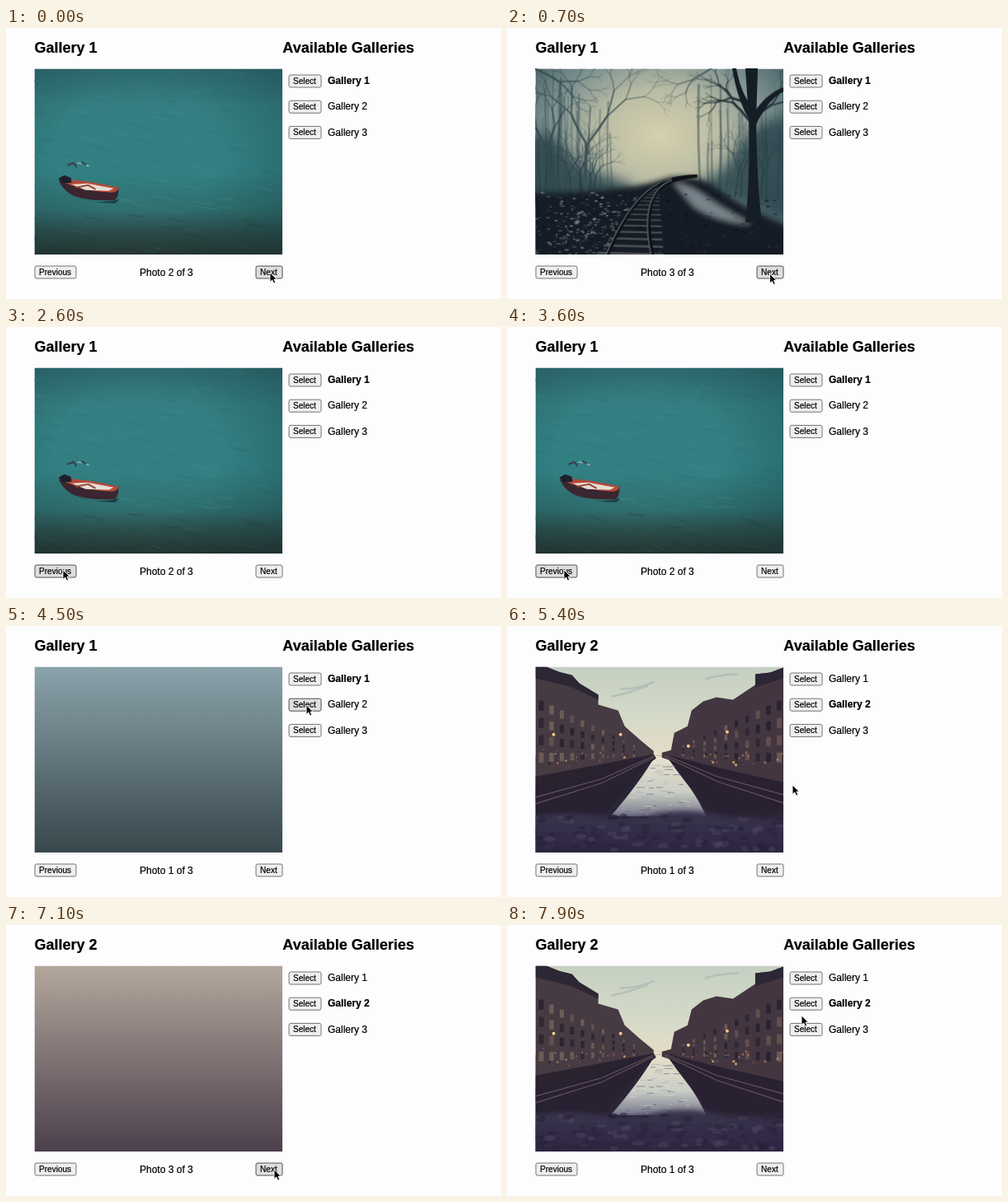
Animation, 600 px wide and 329 px high, one loop 8000 ms. Source, as an HTML page:

```html
<!DOCTYPE html>
<html lang="en">
<head>
<meta charset="utf-8">
<title>Photo galleries</title>
<style>
html, body { margin: 0; width: 100%; height: 100%; overflow: hidden; background: #fdfcfe; }
#stage { display: block; width: 600px; height: 329px; font: 12px "Liberation Sans", Arial, sans-serif; }
text { stroke: #000; stroke-width: .2px; }
.title { font-size: 18px; font-weight: bold; }
.btn rect { fill: #efefef; stroke: #747474; }
.btn text { font-size: 10px; }
.btn.hover rect { fill: #dedede; stroke: #505050; }
.bold { font-weight: bold; }
.photo { visibility: hidden; }
.photo.on { visibility: visible; }
</style>
</head>
<body>
<svg id="stage" viewBox="0 0 600 329">
  <defs>
    <linearGradient id="sea" x2="0" y2="1">
      <stop offset="0" stop-color="#316e73"/><stop offset=".2" stop-color="#347e81"/>
      <stop offset=".55" stop-color="#328083"/><stop offset=".76" stop-color="#316f6f"/>
      <stop offset=".88" stop-color="#2d4f4c"/><stop offset="1" stop-color="#2a3733"/>
    </linearGradient>
    <radialGradient id="vignette" cx=".42" cy=".45" r=".75">
      <stop offset=".45" stop-color="#0d2b30" stop-opacity="0"/><stop offset="1" stop-color="#0d2b30" stop-opacity=".32"/>
    </radialGradient>
    <radialGradient id="mist" cx=".5" cy=".36" r=".62">
      <stop offset="0" stop-color="#d6d0ad"/><stop offset=".4" stop-color="#b9bca4"/>
      <stop offset=".72" stop-color="#7e9291"/><stop offset="1" stop-color="#4d676c"/>
    </radialGradient>
    <linearGradient id="dusk" x2="0" y2="1">
      <stop offset="0" stop-color="#c5d0c2"/><stop offset=".3" stop-color="#d6dac8"/><stop offset=".48" stop-color="#e6dcc6"/>
    </linearGradient>
    <linearGradient id="water" x2="0" y2="1">
      <stop offset="0" stop-color="#e8e1cd"/><stop offset=".6" stop-color="#c9cdc4"/><stop offset="1" stop-color="#77778a"/>
    </linearGradient>
    <linearGradient id="cobbles" x2="0" y2="1">
      <stop offset="0" stop-color="#3b3550"/><stop offset="1" stop-color="#28203b"/>
    </linearGradient>
    <linearGradient id="path" x2="0" y2="1">
      <stop offset="0" stop-color="#a5685f"/><stop offset=".25" stop-color="#8f5257"/><stop offset="1" stop-color="#743f50"/>
    </linearGradient>
    <linearGradient id="plainA" x2="0" y2="1">
      <stop offset="0" stop-color="#8ba3ab"/><stop offset="1" stop-color="#38474c"/>
    </linearGradient>
    <linearGradient id="plainB" x2="0" y2="1">
      <stop offset="0" stop-color="#b3a79c"/><stop offset="1" stop-color="#4b3f4c"/>
    </linearGradient>
    <filter id="soft1"><feGaussianBlur stdDeviation=".7"/></filter>
    <filter id="soft3" x="-20%" y="-20%" width="140%" height="140%"><feGaussianBlur stdDeviation="3"/></filter>
    <filter id="soft8" x="-30%" y="-50%" width="160%" height="200%"><feGaussianBlur stdDeviation="8"/></filter>
  </defs>

  <text class="title" id="heading" x="34.5" y="30">Gallery 1</text>
  <text class="title" x="335.3" y="30">Available Galleries</text>

  <svg x="34.5" y="49.5" width="300.5" height="225.5" viewBox="0 0 300 225" preserveAspectRatio="none">
    <g class="photo" id="p11"><rect width="300" height="225" fill="url(#plainA)"/></g>

    <g class="photo" id="p12">
      <rect width="300" height="225" fill="url(#sea)"/>
      <g id="waves" fill="none" filter="url(#soft1)"/>
      <rect width="300" height="225" fill="url(#vignette)"/>
      <g filter="url(#soft1)">
        <path d="M36 149Q68 168 103 158L98 163Q60 163 36 149" fill="#193f45"/>
        <path d="M29 135Q62 147 102 144Q102 154 98 159Q70 161 50 155Q36 150 29 135" fill="#3a2630"/>
        <path d="M29 134Q60 134 102 144Q101 149 94 150Q52 148 29 134" fill="#b4493a"/>
        <path d="M45 140L64 139L96 145L90 148L62 147Z" fill="#e6ddd3"/>
        <path d="M50 144L65 141L74 146" fill="none" stroke="#96493e" stroke-width="2"/>
        <path d="M29 133L36 129L44 132L45 138L34 139Z" fill="#1d1f2c"/>
        <path d="M40 117L47 114L51 119M57 113L62 116" fill="none" stroke="#393d4c" stroke-width="2"/>
        <path d="M52 114L57 115M63 117L66 118" stroke="#a3b5b5" stroke-width="1.5"/>
      </g>
    </g>

    <g class="photo" id="p13">
      <rect width="300" height="225" fill="url(#mist)"/>
      <g filter="url(#soft8)">
        <path d="M-30 70L25 85L55 120L115 140V165H-30Z" fill="#28434b" opacity=".85"/>
        <path d="M330 45L265 70L225 125L190 142L330 190Z" fill="#2c454e" opacity=".85"/>
      </g>
      <g id="trees" fill="none" stroke-linecap="round" filter="url(#soft1)"/>
      <g filter="url(#soft3)">
        <path d="M-10 150Q80 152 140 138L165 131Q200 128 225 148T310 192V240H-10Z" fill="#161d25"/>
        <path d="M166 137Q190 142 205 154T262 188Q220 186 192 167Z" fill="#77838a"/>
      </g>
      <g id="snow"/>
      <g id="sleepers" stroke="#4a5054"/>
      <g fill="none">
        <path d="M87 226C100 195 125 141 165 134Q180 130 196 130M142 226C133 185 135 146 165 136Q180 131 196 130" stroke="#0e1218" stroke-width="4"/>
        <path d="M85 226C98 195 124 141 165 133M140 226C131 185 134 146 165 135" stroke="#6f7c7e" stroke-width="1.1"/>
      </g>
      <g fill="#151d26" filter="url(#soft1)">
        <path d="M254 0H269L267 60Q268 140 274 186H254Q260 130 258 60Z"/>
        <path d="M259 62Q245 40 238 0H243Q250 34 263 46ZM265 52Q280 30 301 22V27Q280 38 267 68Z"/>
      </g>
    </g>

    <g class="photo" id="p21">
      <rect width="300" height="225" fill="url(#dusk)"/>
      <path d="M92 36Q112 32 136 23M102 27Q125 27 144 18M205 15Q225 9 246 9" fill="none" stroke="#b4c0b8" stroke-width="2.5" filter="url(#soft1)"/>
      <rect y="108" width="300" height="117" fill="#2b2637"/>
      <path d="M145 108H158Q188 142 207 181H91Q125 142 145 108" fill="url(#water)" filter="url(#soft1)"/>
      <g filter="url(#soft1)">
        <path d="M0 0H13L28 6V12L44 10L53 20L76 34V46L100 53L108 72L126 88L143 102V111L0 164Z" fill="#463a43"/>
        <path d="M300 1L284 7L266 9V22L239 40L219 37L203 42L189 53L184 72L168 80L164 101L153 104V110L300 160Z" fill="#433640"/>
        <path d="M0 0H13L28 6L44 10L53 20L76 34L76 40L42 24L0 14ZM300 1L284 7L266 9V25L300 14Z" fill="#2d2634"/>
      </g>
      <g id="windows"/>
      <g filter="url(#soft1)">
        <path d="M0 133L80 118L143 106L146 111L86 152L0 184Z" fill="#2b2230"/>
        <path d="M0 149L78 129L143 107L128 128L85 178H0Z" fill="#272131"/>
        <path d="M300 140L220 122L157 106L169 123L211 178H300Z" fill="#292132"/>
        <path d="M0 158L80 136L143 108M0 166L80 141L143 110M300 155L220 133L157 107M300 165L220 139L157 109" fill="none" stroke="#66515a" stroke-width="1.2"/>
      </g>
      <g id="ripples"/>
      <path d="M-10 184Q30 174 68 180T145 178T220 180T310 184V240H-10Z" fill="url(#cobbles)" filter="url(#soft3)"/>
      <g id="stones" filter="url(#soft1)"/>
    </g>

    <g class="photo" id="p22">
      <rect width="300" height="225" fill="#ead6af"/>
      <g id="foliage" filter="url(#soft1)"/>
      <rect x="-10" y="50" width="320" height="26" fill="#a09a78" filter="url(#soft3)"/>
      <rect y="70" width="300" height="155" fill="url(#path)"/>
      <path d="M-10 68H118Q165 72 158 87Q110 103 72 114L-10 140Z" fill="#77755f" filter="url(#soft3)"/>
      <path d="M-10 132Q60 116 130 92L178 80Q135 125 140 165Q80 205 58 240H-10Z" fill="#8f4641" opacity=".8" filter="url(#soft8)"/>
      <path d="M214 68H310V82Q255 76 214 74Z" fill="#948062" filter="url(#soft3)"/>
      <path d="M0 51H300M0 62H300" stroke="#807363" stroke-width="1" opacity=".5"/>
      <g fill="#6d4549" filter="url(#soft1)">
        <path d="M82 38H88V70H82ZM138 38H143V68H138ZM200 33H206V68H200ZM288 26H294V68H288Z"/>
        <path d="M15 0H50Q51 50 61 73L38 70L14 74Q23 50 15 0" fill="#4d2f38"/>
      </g>
      <path d="M24 0Q30 34 24 70M37 0Q36 40 46 70" fill="none" stroke="#6d4549" stroke-width="2"/>
      <g id="leaves"/>
      <path d="M29 213L38 196L42 188L47 204L60 207L47 216L42 225H31Z" fill="#cc704a"/>
      <path d="M50 190L62 181L80 182L67 191ZM140 197L151 192L161 196L149 203ZM250 199L264 192L270 198L258 203Z" fill="#cf7b53"/>
    </g>

    <g class="photo" id="p23"><rect width="300" height="225" fill="url(#plainB)"/></g>
  </svg>

  <g id="controls"></g>
  <text id="count" x="162" y="301">Photo 2 of 3</text>
  <path id="pointer" d="M0 0V11.4L2.7 8.9L4.6 13L6.7 12.1L4.9 8.1H8.4Z" fill="#000" stroke="#fff" stroke-width=".9"/>
</svg>

<script>
const $ = id => document.getElementById(id);
const NS = 'http://www.w3.org/2000/svg';

function add(parent, tag, attrs, text) {
  const el = document.createElementNS(NS, tag);
  for (const key in attrs) el.setAttribute(key, attrs[key]);
  if (text) el.textContent = text;
  return parent.appendChild(el);
}

let seed = 7;
const rnd = (a = 0, b = 1) => {
  seed = (seed * 16807) % 2147483647;
  return a + (b - a) * seed / 2147483647;
};
const pick = list => list[Math.floor(rnd(0, list.length))];
const repeat = (n, fn) => { for (let i = 0; i < n; i++) fn(i); };

// Buttons and gallery list
function button(label, x, y, w) {
  const g = add($('controls'), 'g', { class: 'btn' });
  add(g, 'rect', { x: x + .5, y: y + .5, width: w - 1, height: 15, rx: 2 });
  add(g, 'text', { x: x + 5.6, y: y + 11.4 }, label);
  return g;
}
const prev = button('Previous', 34.5, 288.5, 51);
const next = button('Next', 302.5, 288.5, 33);
const selects = [], labels = [];
repeat(3, i => {
  selects.push(button('Select', 342.5, 56.5 + i * 31.2, 40));
  labels.push(add($('controls'), 'text', { x: 390, y: 68 + i * 31.3 }, 'Gallery ' + (i + 1)));
});

// Sea texture
repeat(150, () => {
  const x = rnd(-10, 290), y = rnd(4, 222), w = rnd(8, 26);
  add($('waves'), 'path', {
    d: `M${x} ${y}q${w / 2} ${rnd(-1, 3)} ${w} ${rnd(2, 6)}`,
    stroke: pick(y > 175 ? ['#46645a', '#243c3b'] : ['#43908f', '#2a7073']),
    'stroke-width': rnd(.8, 2), opacity: .4
  });
});

// Bare trees
function branch(x, y, angle, len, width, color) {
  const x2 = x + Math.cos(angle) * len, y2 = y + Math.sin(angle) * len;
  add($('trees'), 'path', {
    d: `M${x} ${y}Q${(x + x2) / 2 + rnd(-3, 3)} ${(y + y2) / 2} ${x2} ${y2}`,
    stroke: color, 'stroke-width': width
  });
  if (len < 8) return;
  [-1, 1].forEach(side => branch(x2, y2, angle + side * rnd(.2, .7), len * rnd(.6, .8), width * .6, color));
}
repeat(60, i => {
  const d = 105 * rnd() ** 1.4, x = i % 2 ? d : 300 - d;
  const top = rnd(0, 95);
  add($('trees'), 'path', {
    d: `M${x} ${top}Q${x + rnd(-5, 5)} ${(top + 155) / 2} ${x + rnd(-4, 4)} 157`,
    stroke: pick(['#3d545a', '#263d45']), 'stroke-width': rnd(.7, 2.2), opacity: rnd(.3, .65)
  });
});
repeat(9, i => branch(i < 5 ? rnd(0, 70) : rnd(230, 300), 155, rnd(-1.8, -1.35), rnd(24, 36), 1.8, '#2c434a'));
branch(61, 150, -1.55, 58, 4, '#3b5155');
branch(18, 150, -1.6, 50, 4, '#354b51');
branch(258, 62, -2.3, 28, 3, '#26333b');
branch(265, 45, -2.8, 30, 3, '#26333b');
branch(266, 60, -.7, 25, 3, '#26333b');
branch(0, 0, .5, 32, 2.5, '#3a5054');
branch(212, 0, 2.6, 26, 2, '#4b5e5d');

// Snow on the verges and sleepers under the rails
repeat(420, i => {
  const y = rnd(150, 225), verge = 125 - (y - 150) * .6;
  const x = i % 3 ? verge * rnd() ** .7 : rnd(0, 300);
  add($('snow'), 'ellipse', {
    cx: x, cy: y, rx: rnd(.6, 3), ry: rnd(.4, 1.3),
    fill: pick(x < verge ? ['#88959a', '#56636b', '#10161c'] : ['#11171d', '#343a40', '#090d12']), opacity: .65
  });
});
repeat(16, i => {
  const k = (i / 15) ** 1.8, y = 145 + 78 * k;
  add($('sleepers'), 'path', {
    d: `M${139 - 64 * k} ${y}L${149 + 6 * k} ${y + 2 * k}`, 'stroke-width': .7 + 2.2 * k
  });
});

// Canal houses, reflections and cobbles
const houseEdge = (u, row) => 106 - (1 - u) * (70 - row * 21);
repeat(2, side => repeat(10, col => repeat(4, row => {
  const u = col / 10 * .92, x = u * 138 + 4;
  const y = houseEdge(u, row) + 5 * (1 - u);
  add($('windows'), 'rect', {
    x: side ? 300 - x - 4 : x, y, width: 5 * (1 - u) + 1, height: 11 * (1 - u) + 1,
    fill: pick(['#241f2d', '#2a2430', '#6a5550', '#766459']), opacity: .8
  });
})));
repeat(56, i => {
  const d = rnd(0, 125), x = i % 2 ? 300 - d : d;
  add($('windows'), 'circle', {
    cx: x, cy: 109 + (1 - d / 140) * rnd(-12, 18), r: rnd(.6, 1.6),
    fill: pick(['#d29b61', '#986456', '#754a4d', '#302432'])
  });
});
[[22, 82], [103, 82], [232, 79], [185, 96]].forEach(([cx, cy]) =>
  add($('windows'), 'circle', { cx, cy, r: 2, fill: '#f1c88b', filter: 'url(#soft1)' }));
repeat(65, () => {
  const y = rnd(118, 180), half = (y - 105) * .72;
  const x = 150 + rnd(-half, half);
  add($('ripples'), 'rect', {
    x, y, width: rnd(3, 12), height: 1,
    fill: pick(['#52506a', '#dbdacd', '#aaacb0']), opacity: .55
  });
});
repeat(120, () => {
  const y = rnd(180, 222);
  add($('stones'), 'ellipse', {
    cx: rnd(0, 300), cy: y, rx: rnd(3, 8), ry: rnd(2, 4),
    fill: pick(['#4b455f', '#252035', '#352e49']), opacity: .5
  });
});

// Autumn trees, grass and fallen leaves
repeat(130, i => {
  const x = i * 2.4 - 5, r = rnd(4, 9);
  add($('foliage'), 'ellipse', {
    cx: x, cy: rnd(17 + 7 * Math.sin(x / 17), 52), rx: r, ry: r,
    fill: pick(['#c4775c', '#b5624f', '#cf8a66', '#a3605a']), opacity: .8
  });
});
repeat(260, () => {
  const x = rnd(0, 150), y = rnd(73, 134 - x * .28);
  add($('leaves'), 'path', {
    d: `M${x} ${y}l${rnd(-2, 2)} ${rnd(-5, -2)}`,
    stroke: pick(['#596151', '#8f8d71', '#6b6a56', '#5d5048']), opacity: .8
  });
});
repeat(1300, i => {
  const near = rnd() ** .8, y = 74 + near * 150;
  const onPath = i % 3 === 0;
  const x = onPath ? rnd(0, 300) : rnd() * (190 - near * 65);
  if (!onPath && y < 122 - x * .3 && i % 4) return;
  const size = rnd(.8, 1.8) + near * (onPath ? 1 : 2.6);
  add($('leaves'), 'ellipse', {
    cx: x, cy: y, rx: size, ry: size * .45,
    transform: `rotate(${rnd(-45, 45)} ${x} ${y})`,
    fill: pick(onPath ? ['#5b3341', '#673947', '#95585b', '#a9604f'] : ['#c0603f', '#8a3d38', '#a94d39', '#5e2d36', '#cf7a55']),
    opacity: onPath ? .65 : .85
  });
});

// Timeline: [time, x, y] for the pointer, [time, gallery, photo] for the view
const LOOP = 8000, STEP = 100;
const moves = [
  [0, 320, 297], [500, 320, 297], [900, 317, 300], [1100, 317, 300], [1500, 306, 299.5],
  [2300, 69, 295], [3900, 69, 295], [4500, 364, 96], [4900, 364, 96], [5400, 346, 193],
  [6000, 325, 301], [6300, 325, 297], [7300, 325, 297], [7900, 357, 110], [8000, 357, 110]
];
const views = [
  [0, 1, 2], [700, 1, 3], [2400, 1, 2], [3800, 1, 1],
  [4700, 2, 1], [6200, 2, 2], [6800, 2, 3], [7200, 2, 1]
];

function pointerAt(t) {
  const i = moves.findIndex(m => m[0] > t);
  const [t0, x0, y0] = moves[i - 1], [t1, x1, y1] = moves[i];
  const u = (t - t0) / (t1 - t0), k = u * u * (3 - 2 * u);
  return [x0 + (x1 - x0) * k, y0 + (y1 - y0) * k];
}

const within = (x, y, l, top, w) => x >= l && x <= l + w && y >= top && y <= top + 16;

function render(t) {
  const [, gallery, photo] = views.filter(v => v[0] <= t).pop();
  const [x, y] = pointerAt(t);
  $('pointer').setAttribute('transform', `translate(${x} ${y})`);
  $('heading').textContent = 'Gallery ' + gallery;
  $('count').textContent = `Photo ${photo} of 3`;
  document.querySelectorAll('.photo').forEach(p => p.classList.toggle('on', p.id === `p${gallery}${photo}`));
  prev.classList.toggle('hover', within(x, y, 34.5, 288.5, 51));
  next.classList.toggle('hover', within(x, y, 302.5, 288.5, 33));
  selects.forEach((b, i) => b.classList.toggle('hover', within(x, y, 342.5, 56.5 + i * 31.2, 40)));
  labels.forEach((l, i) => l.classList.toggle('bold', i + 1 === gallery));
}

const start = performance.now();
let last = -1;
function tick(now) {
  const t = Math.floor(Math.max(0, now - start) % LOOP / STEP) * STEP;
  if (t !== last) render(last = t);
  requestAnimationFrame(tick);
}
render(0);
requestAnimationFrame(tick);
</script>
</body>
</html>
```
